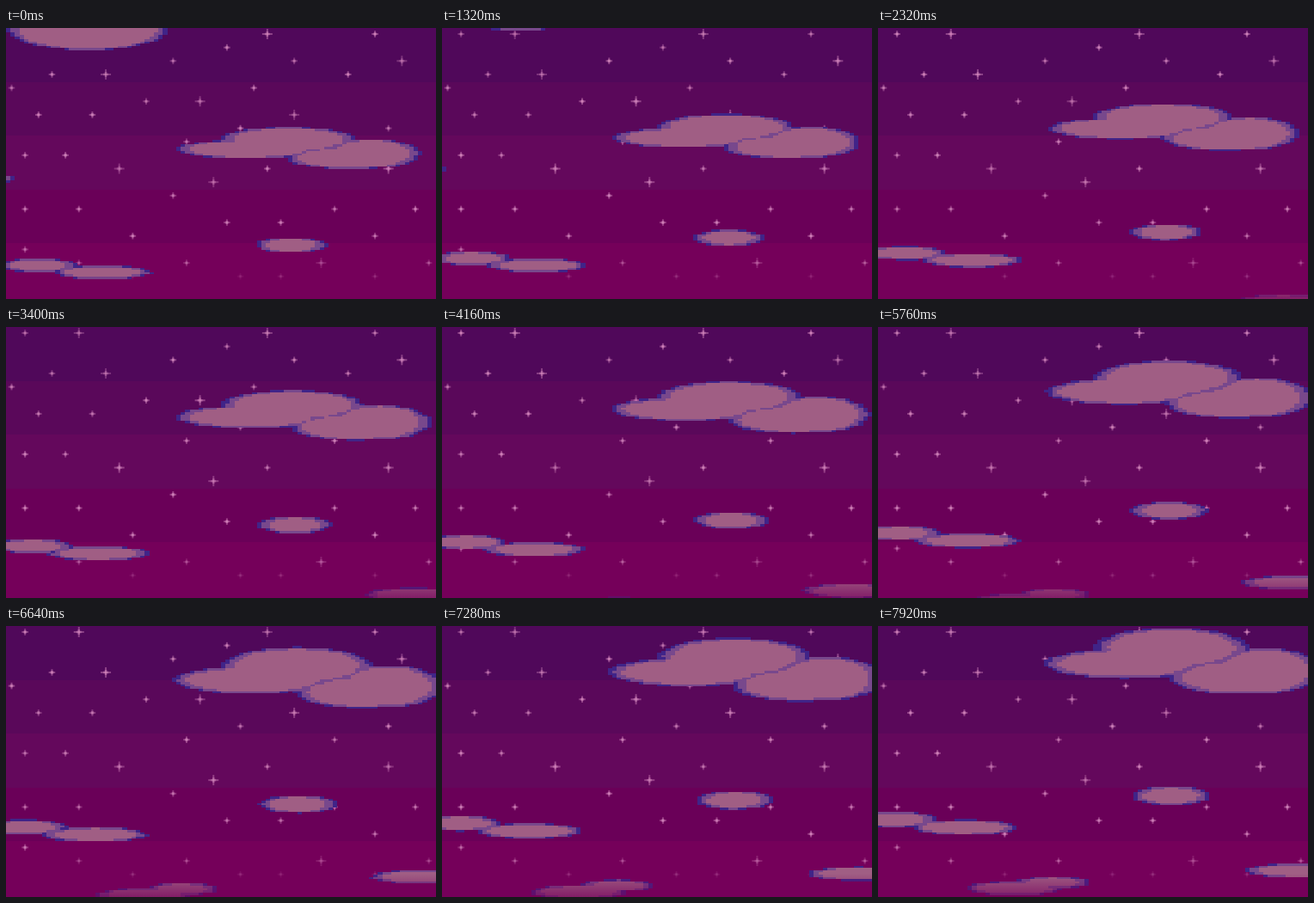
These frames come from a looping animation (500 by 315 pixels, 8 s). An HTML page with a canvas:

```html
<!DOCTYPE html>
<html lang="en">
<head>
<meta charset="utf-8">
<title>Clouds at dusk</title>
<style>
  html, body { margin: 0; width: 100%; height: 100%; overflow: hidden; background: #75005a; }
  canvas { display: block; width: 500px; height: 315px; }
</style>
</head>
<body>
<canvas id="stage" width="500" height="315"></canvas>
<script>
const ctx = document.getElementById('stage').getContext('2d');
const W = 500, H = 315, LOOP = 8000;
const PIXEL = W / 192, CELL = 15.65;
const SKY = ['#50085a', '#5a085a', '#64085c', '#6a0058', '#75005a'];

// Stars sit on a lattice: one string of columns per row, "+" marks a bright star
const STARS = [
  '1 5+ 19+ 27', '16', '12 21 29+', '3 7+ 25', '0 18', '10 14+', '2 6 21+',
  '17 28', '13 24', '1 4', '8+ 19 28+', '15+', '12', '1 5 24 30',
  '16 20', '9 27', '1', '5 13 23+ 31', '9 17 20 27'
].flatMap((columns, row) => columns.split(' ').map(mark => ({
  x: 6.5 + CELL * parseInt(mark),
  y: 7 + CELL * row,
  arm: mark.endsWith('+') ? 6 : 3.8
})));

// Clouds at the start of the loop, each made of puffs [cx, cy, rx, ry]
const CLOUDS = [
  [[95, 1, 94, 25]],
  [[281, 141, 82, 11], [328, 129.5, 78, 14.5], [398, 151, 72, 13], [424, 146, 58, 17]],
  [[332, 252.5, 42, 9]],
  [[38, 276, 45, 8], [113, 284, 57, 8]],
  [[-10, 175, 20, 5]],
  [[465, 331, 55, 8]],
  [[207, 345, 39, 7], [166, 352, 51, 8]]
];
const LAYERS = [
  { color: '#402488', dx: 0, dy: 0 },
  { color: '#78488c', dx: 5, dy: 0.5 },
  { color: '#a05e84', dx: 13, dy: 1.7 }
];

// Clouds rise faster and spread from CENTER as they climb above the horizon
const CENTER = 240, DEPTH = 212, RISE = 0.222, SPREAD = 500;

function movePuff([cx, cy, rx, ry], t) {
  const height = H - cy;
  const angle = Math.atan(height / DEPTH);
  const risen = DEPTH * Math.tan(angle + RISE * t);
  const widen = (risen + SPREAD) / (height + SPREAD);
  const heighten = (Math.cos(angle) / Math.cos(angle + RISE * t)) ** 2;
  return {
    cx: CENTER + (cx - CENTER) * widen, cy: H - risen,
    rx: rx * widen, ry: ry * heighten, heighten
  };
}

const snap = (v, step) => Math.round(Math.round(v / step) * step);

// Fills an ellipse as rows of coarse pixels
function fillPixelEllipse(cx, cy, rx, ry) {
  for (let y = Math.floor((cy - ry) / PIXEL) * PIXEL; y < cy + ry; y += PIXEL) {
    const d = (y + PIXEL / 2 - cy) / ry;
    if (Math.abs(d) >= 1) continue;
    const half = rx * Math.sqrt(1 - d * d);
    const left = snap(cx - half, PIXEL * 2), right = snap(cx + half, PIXEL * 2);
    const top = Math.round(y);
    ctx.fillRect(left, top, right - left, Math.round(y + PIXEL) - top);
  }
}

function drawCloud(puffs, t) {
  const moved = puffs.map(puff => movePuff(puff, t));
  for (const { color, dx, dy } of LAYERS) {
    ctx.fillStyle = color;
    for (const { cx, cy, rx, ry, heighten } of moved) {
      fillPixelEllipse(cx, cy, rx - dx * heighten ** 0.5, ry - dy * heighten);
    }
  }
}

function drawCross(x, y, arm, width) {
  ctx.fillRect(x - arm, y - width / 2, arm * 2, width);
  ctx.fillRect(x - width / 2, y - arm, width, arm * 2);
}

function drawStar({ x, y, arm }, time) {
  const clearness = Math.min(1, (300 - y) / 50);
  const twinkle = 0.85 + 0.15 * Math.sin(time * Math.PI / 1000 + x * 1.7 + y);
  ctx.fillStyle = '#d88cc0';
  ctx.globalAlpha = clearness * twinkle * 0.45;
  drawCross(x, y, arm, 2);
  drawCross(x, y, arm / 2, PIXEL);
  ctx.globalAlpha = 1;
}

const haze = ctx.createLinearGradient(0, 288, 0, H);
haze.addColorStop(0, '#75005a00');
haze.addColorStop(1, '#75005ab0');

function draw(time) {
  SKY.forEach((color, i) => {
    ctx.fillStyle = color;
    ctx.fillRect(0, Math.round(i * 62.5), W, 66);
  });
  STARS.forEach(star => drawStar(star, time));
  CLOUDS.forEach(cloud => drawCloud(cloud, time / LOOP));
  ctx.fillStyle = haze;
  ctx.fillRect(0, 288, W, H - 288);
}

const start = performance.now();
function frame() {
  draw((performance.now() - start) % LOOP);
  requestAnimationFrame(frame);
}
frame();
</script>
</body>
</html>
```
